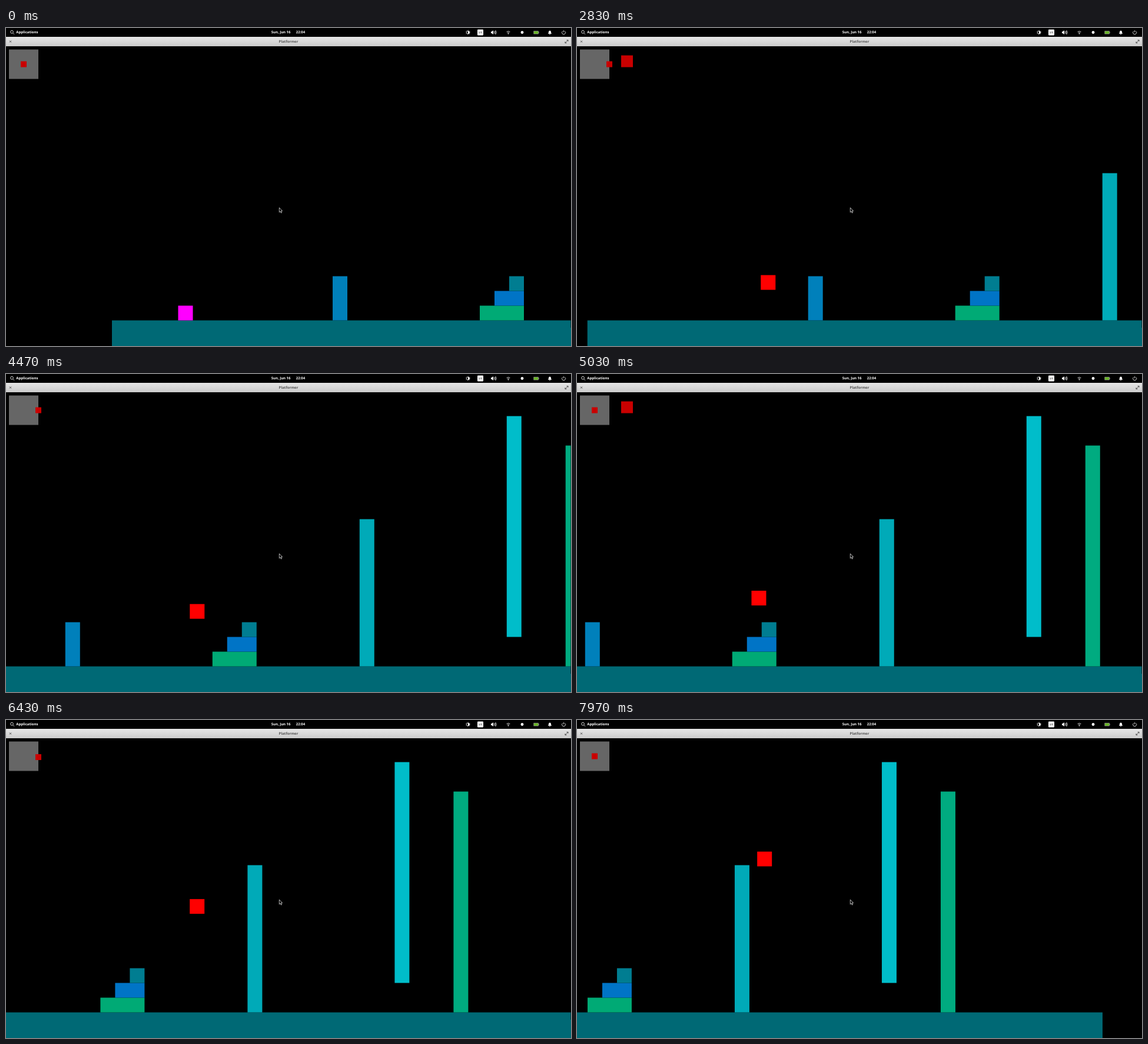
These frames come from a looping animation (960x540 px, 8000 ms). An HTML page:

```html
<!DOCTYPE html>
<html lang="en">
<head>
<meta charset="utf-8">
<title>Platformer</title>
<style>
  html, body { margin: 0; width: 100%; height: 100%; overflow: hidden; background: #000; }
  svg { display: block; width: 960px; height: 540px; }
  text { font: bold 6px "Open Sans", sans-serif; text-rendering: geometricPrecision; }
</style>
</head>
<body>
<svg viewBox="0 0 960 540">
  <defs>
    <linearGradient id="bar" x2="0" y2="1">
      <stop stop-color="#e6e6e6"/><stop offset="1" stop-color="#cbcbcb"/>
    </linearGradient>
    <clipPath id="view"><path d="M0 31H959.5V540H0z"/></clipPath>
  </defs>
  <rect width="960" height="540"/>

  <g clip-path="url(#view)">
    <g id="world"></g>
    <rect id="player" width="25" height="25"/>
  </g>
  <rect x="5" y="36.5" width="50" height="50" fill="#666"/>
  <rect id="thumb" width="10" height="10" fill="#c80000"/>
  <rect id="button" x="75" y="46.5" width="20" height="20" fill="#c80000"/>

  <!-- title bar -->
  <rect y="15" width="960" height="16" fill="url(#bar)"/>
  <text x="480" y="25.2" fill="#555" text-anchor="middle">Platformer</text>
  <g fill="none" stroke="#444" stroke-width=".9">
    <path d="M6 21.5l3 3m0-3l-3 3"/>
    <path d="M950 25.5l5-5m-2.4 0H955v2.4M950 23.1v2.4h2.4"/>
  </g>

  <!-- panel -->
  <g fill="#fff">
    <text x="17.3" y="9.3">Applications</text>
    <text x="450.7" y="9.3">Sun, Jun 16</text>
    <text x="492.8" y="9.3">22:04</text>
    <rect x="801" y="2.5" width="10" height="10" rx="1"/>
    <text x="806" y="9.4" text-anchor="middle" style="font-weight:400;fill:#222">us</text>
    <path d="M824 6h1.5L828 4v7l-2.5-2H824z"/>
    <path d="M785 5a2.5 2.5 0 0 1 0 5z"/>
    <circle cx="853.5" cy="9.6" r=".9"/>
    <circle cx="877" cy="7.5" r="2.4"/>
    <path d="M920.8 9.7Q922 8.7 922 6.7Q922 4.4 924 4.4T926 6.7Q926 8.7 927.2 9.7zM923 10.2h2a1 1 0 0 1-2 0z"/>
  </g>
  <g fill="none" stroke="#fff" stroke-width=".8">
    <circle cx="10" cy="6.7" r="2.4"/><path d="M11.8 8.5l2.2 2.3"/>
    <circle cx="785" cy="7.5" r="2.5"/>
    <circle cx="785" cy="7.5" r="3.7" stroke-dasharray=".8 2.106"/>
    <path d="M829.2 5.8q1.3 1.7 0 3.4M830.6 4.8q2 2.7 0 5.4M831.8 4q2.6 3.5 0 7"/>
    <path d="M850.6 6.6q2.9-2.3 5.8 0M851.8 8.2q1.7-1.4 3.4 0"/>
    <path d="M945.8 5.4a3 3 0 1 0 3.6 0M947.6 4v3.2"/>
  </g>
  <rect x="896.8" y="5.2" width="7.6" height="4.8" fill="#68b723" stroke="#9a9a9a" stroke-width=".7"/>
  <rect x="904.8" y="6.6" width="1" height="2" fill="#9a9a9a"/>

  <path d="M464.3 305v8l1.8-1.7 1.3 2.8 1.2-.6-1.3-2.7h2.3z" stroke="#ddd" stroke-width=".8"/>
</svg>
<script>
const LOOP = 8000, STEP = 1 / 1000;                     // ms, s
const SIZE = 25, HOME = 292.5;                          // px
const SPEED = 200, GRAVITY = 400, KICK = 583;           // px/s, px/s², px/s
const CAMERA_LAG = 0.1, KICK_FADE = 0.06;               // s

const $ = id => document.getElementById(id);
const set = (el, attrs) => { for (const k in attrs) el.setAttribute(k, attrs[k]); };

const block = (x, top, w, h, fill) => ({ x, top, w, h, fill });
const blocks = [
  block(180, 496.5, 1500, 60, '#006975'),
  block(555, 421.5, 25, 75, '#0080bb'),
  block(805, 471.5, 75, 25, '#00aa75'),
  block(830, 446.5, 50, 25, '#0074c6'),
  block(855, 421.5, 25, 25, '#007d91'),
  block(1055, 246.5, 25, 250, '#00aab8'),
  block(1305, 71.5, 25, 375, '#00bdca'),
  block(1405, 121.5, 25, 375, '#00ab80'),
];

// Player input: stick pushes (start, full, release, end, offset) and jumps.
const pushes = [
  [1670, 2170, 4860, 4896, 25, 0],
  [5480, 5540, 5600, 5660, 12.5, 0],
  [5820, 5970, 7915, 7959, 25, 1.5],
];
const jumps = [
  { at: 2500, speed: 223, hold: 560 },
  { at: 3112, speed: 286, hold: 890, offWall: true },
  { at: 4640, speed: 262, hold: 480 },
  { at: 5938, speed: 286, hold: 460 },
  { at: 6830, speed: 180, hold: 350, offWall: true },
  { at: 7230, speed: 178, hold: 370, offWall: true },
];

function stickAt(t) {
  const push = pushes.find(p => t >= p[0] && t < p[3]);
  if (!push) return { dx: 0, dy: 0 };
  const [start, full, release, end, dx, dy] = push;
  const k = Math.min(1, (t - start) / (full - start), (end - t) / (end - release));
  return { dx: dx * k, dy: dy * k };
}

// Runs the game once and keeps the state of every millisecond.
function simulate() {
  const states = [];
  let x = HOME, y = 471.5, vy = 0, kick = 0, camera = x, grounded = true;
  const besideRow = b => y + SIZE > b.top && y < b.top + b.h;
  const overlaps = b => besideRow(b) && x + SIZE > b.x && x < b.x + b.w;

  for (let t = 0; t < LOOP; t++) {
    const atWall = blocks.some(b => besideRow(b) && Math.abs(b.x - x - SIZE) <= 2);
    states.push({ x, y, camera, fill: grounded ? '#f0f' : atWall ? '#ff0' : '#f00' });

    const jump = jumps.find(j => j.at === t);
    if (jump) {
      vy = -jump.speed;
      if (jump.offWall) kick = KICK;
    }
    x += (SPEED * stickAt(t).dx / 25 - kick) * STEP;
    kick *= Math.exp(-STEP / KICK_FADE);
    const wall = blocks.find(overlaps);
    if (wall) x = wall.x - SIZE;

    y += vy * STEP + GRAVITY / 2 * STEP * STEP;
    vy += GRAVITY * STEP;
    const floor = vy > 0 && blocks.find(overlaps);
    grounded = !!floor;
    if (floor) {
      y = floor.top - SIZE;
      vy = 0;
    }
    camera += (x - camera) * STEP / CAMERA_LAG;
  }
  return states;
}

for (const { x, top, w, h, fill } of blocks) {
  const r = document.createElementNS('http://www.w3.org/2000/svg', 'rect');
  set(r, { x, y: top, width: w, height: h, fill });
  $('world').append(r);
}
const states = simulate();

function draw(now) {
  const t = Math.floor(now % LOOP);
  const { x, y, camera, fill } = states[t];
  const stick = stickAt(t);
  const pressed = jumps.some(j => t >= j.at && t < j.at + j.hold);
  set($('world'), { transform: `translate(${HOME - camera})` });
  set($('player'), { x: x - camera + HOME, y, fill });
  set($('thumb'), { x: 25 + stick.dx, y: 56.5 + stick.dy });
  set($('button'), { visibility: pressed ? 'visible' : 'hidden' });
  requestAnimationFrame(draw);
}
requestAnimationFrame(draw);
</script>
</body>
</html>
```
